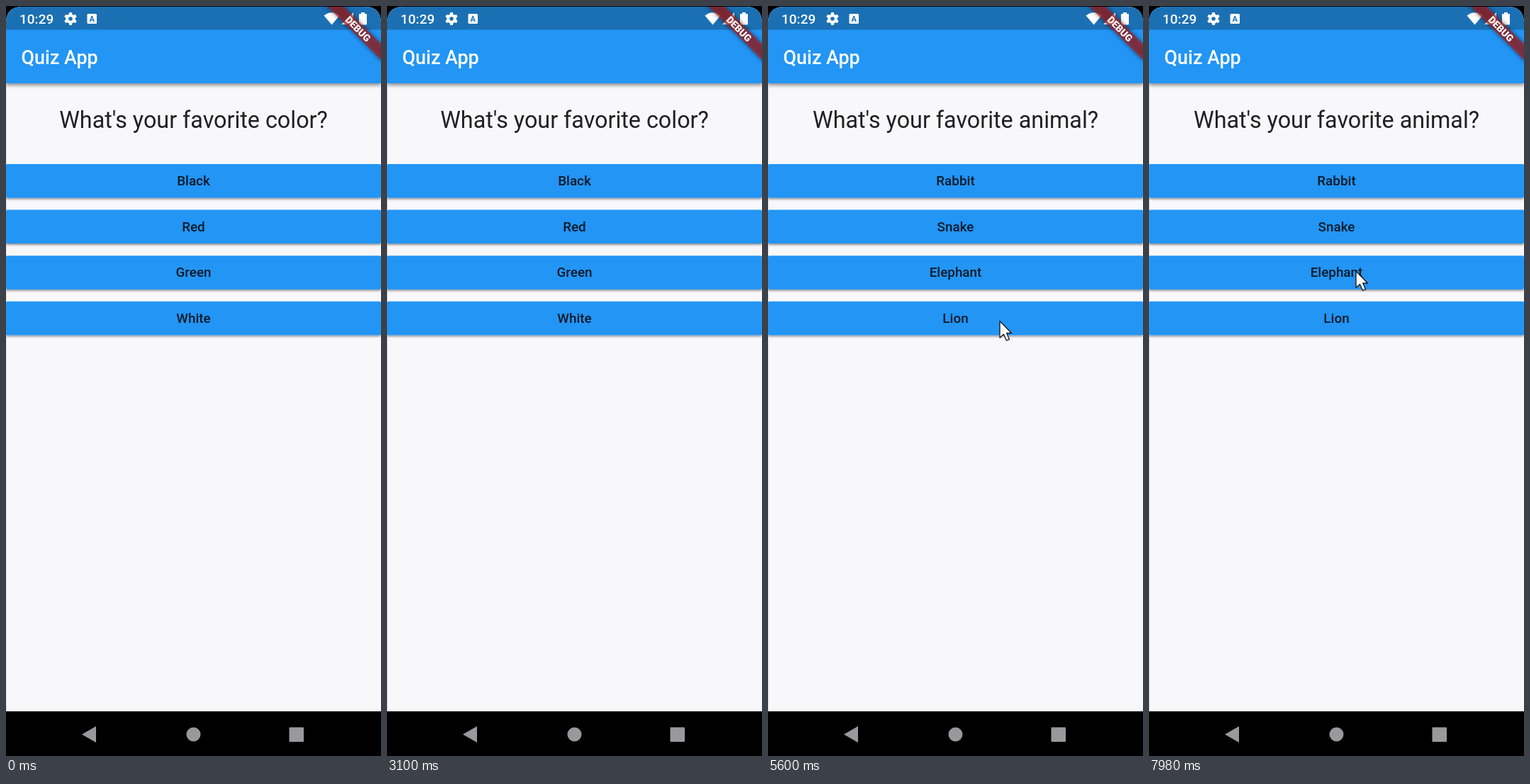
These frames come from a looping animation (529x1058 px, 8 s). An HTML page:

```html
<!DOCTYPE html>
<html lang="en">
<head>
<meta charset="utf-8">
<title>Quiz App</title>
<style>
html, body { margin: 0; width: 100%; height: 100%; overflow: hidden; background: #000; }
svg { display: block; width: 100vw; height: 100vh; font-family: Roboto, sans-serif; }
.mid { text-anchor: middle; }
.medium { font-weight: 500; }
.white { fill: #fff; }
.bar { fill: #2095f5; }
#question { font-size: 32.3px; fill: #202022; }
#answers { font-size: 18.86px; fill: #0b1a28; }
</style>
</head>
<body>
<svg viewBox="0 0 529 1058">
  <defs>
    <clipPath id="screen"><path d="M0 995V24Q0 1 23 1H506Q529 1 529 24V995Z"/></clipPath>
    <filter id="low" x="-5%" y="-30%" width="110%" height="180%">
      <feDropShadow dx="0" dy="2" stdDeviation="1.5" flood-opacity=".42"/>
    </filter>
    <filter id="high" x="-5%" y="-30%" width="110%" height="180%">
      <feDropShadow dx="0" dy="3" stdDeviation="2.5" flood-opacity=".42"/>
    </filter>
    <filter id="blur" x="-20%" y="-80%" width="140%" height="260%">
      <feGaussianBlur stdDeviation="3"/>
    </filter>
  </defs>

  <g clip-path="url(#screen)">
    <rect width="529" height="995" fill="#f8f8fb"/>
    <rect y="109" width="1" height="886" fill="#dfdfe2"/>
    <rect class="bar" y="20" width="529" height="89" filter="url(#high)"/>
    <rect width="529" height="33.5" fill="#1b70b4"/>
    <text class="white medium" x="21.5" y="81.5" font-size="26.9">Quiz App</text>

    <g class="white">
      <text class="medium" x="19" y="25" font-size="19">10:29</text>
      <g id="gear" transform="translate(91 18)"></g>
      <rect x="114.5" y="11" width="13.5" height="14" rx="1.5"/>
      <text class="mid" x="121.2" y="22" font-size="11" font-weight="700" fill="#1b70b4">A</text>
      <path d="M448.500 13.500Q459.500 5 470.500 13.500L459.500 26.500Z"/>
      <path d="M490 9V26H473Z"/>
      <path d="M501 9H506V11H508Q509 11 509 12V25Q509 26.500 508 26.500H499.500Q498 26.500 498 25V12Q498 11 499 11H501Z"/>
    </g>

    <g transform="translate(529 0) rotate(45)">
      <rect x="-58" y="37.700" width="116" height="16.200" opacity=".5" filter="url(#blur)"/>
      <rect x="-58" y="37.700" width="116" height="16.200" fill="#b71c1c" opacity=".63"/>
      <text class="white mid" y="50.700" font-size="13.700" font-weight="900">DEBUG</text>
    </g>

    <text id="question" class="mid" x="264.5" y="172"></text>
    <g id="answers" class="mid medium"></g>
  </g>

  <g fill="#99989c">
    <path d="M107 1027.500L127 1016V1039Z"/>
    <circle cx="264.500" cy="1027.500" r="10"/>
    <rect x="399.500" y="1017.500" width="20.500" height="20.500" rx="1"/>
  </g>

  <path id="cursor" d="M0 0V23.500L5.500 18.500L9.500 27.500L13.500 25.700L9.700 17H16.500Z"
    fill="#fff" stroke="#151515" stroke-width="1.3" stroke-linejoin="round"/>
</svg>
<script>
const LOOP = 8000, APPEAR = 4300, SWITCH = 4560;
const quiz = [
  { text: "What's your favorite color?", answers: ["Black", "Red", "Green", "White"] },
  { text: "What's your favorite animal?", answers: ["Rabbit", "Snake", "Elephant", "Lion"] }
];
// Cursor stops: time, x, y
const stops = [
  [APPEAR, 327, 444.5], [5860, 327, 444.5], [6400, 304, 385],
  [6700, 304, 385], [7400, 292, 374], [LOOP, 292, 374]
];
const byId = id => document.getElementById(id);
const question = byId("question"), answers = byId("answers"), cursor = byId("cursor");

byId("gear").innerHTML = '<circle r="4.800" fill="none" stroke="#fff" stroke-width="4"/>' +
  [0, 60, 120, 180, 240, 300].map(a =>
    `<path d="M-2.500-5L-1.800-9H1.800L2.500-5Z" transform="rotate(${a})"/>`).join("");

answers.innerHTML = [0, 1, 2, 3].map(i => {
  const y = 223 + i * 64.6;
  return `<rect class="bar" y="${y}" width="529" height="47.5" rx="2" filter="url(#low)"/>
    <text x="264.5" y="${y + 30.2}"></text>`;
}).join("");
const labels = answers.querySelectorAll("text");

let shown;
function show(page) {
  if (page === shown) return;
  shown = page;
  question.textContent = page.text;
  labels.forEach((label, i) => label.textContent = page.answers[i]);
}

function cursorAt(t) {
  const i = stops.findIndex(s => s[0] > t);
  const [t0, x0, y0] = stops[i - 1], [t1, x1, y1] = stops[i];
  const p = (t - t0) / (t1 - t0), e = p * p * (3 - 2 * p);
  return [x0 + (x1 - x0) * e, y0 + (y1 - y0) * e];
}

function draw(now) {
  const t = now % LOOP;
  show(quiz[t < SWITCH ? 0 : 1]);
  cursor.style.display = t < APPEAR ? "none" : "";
  if (t >= APPEAR) cursor.setAttribute("transform", `translate(${cursorAt(t)})`);
  requestAnimationFrame(draw);
}
draw(performance.now());
</script>
</body>
</html>
```
